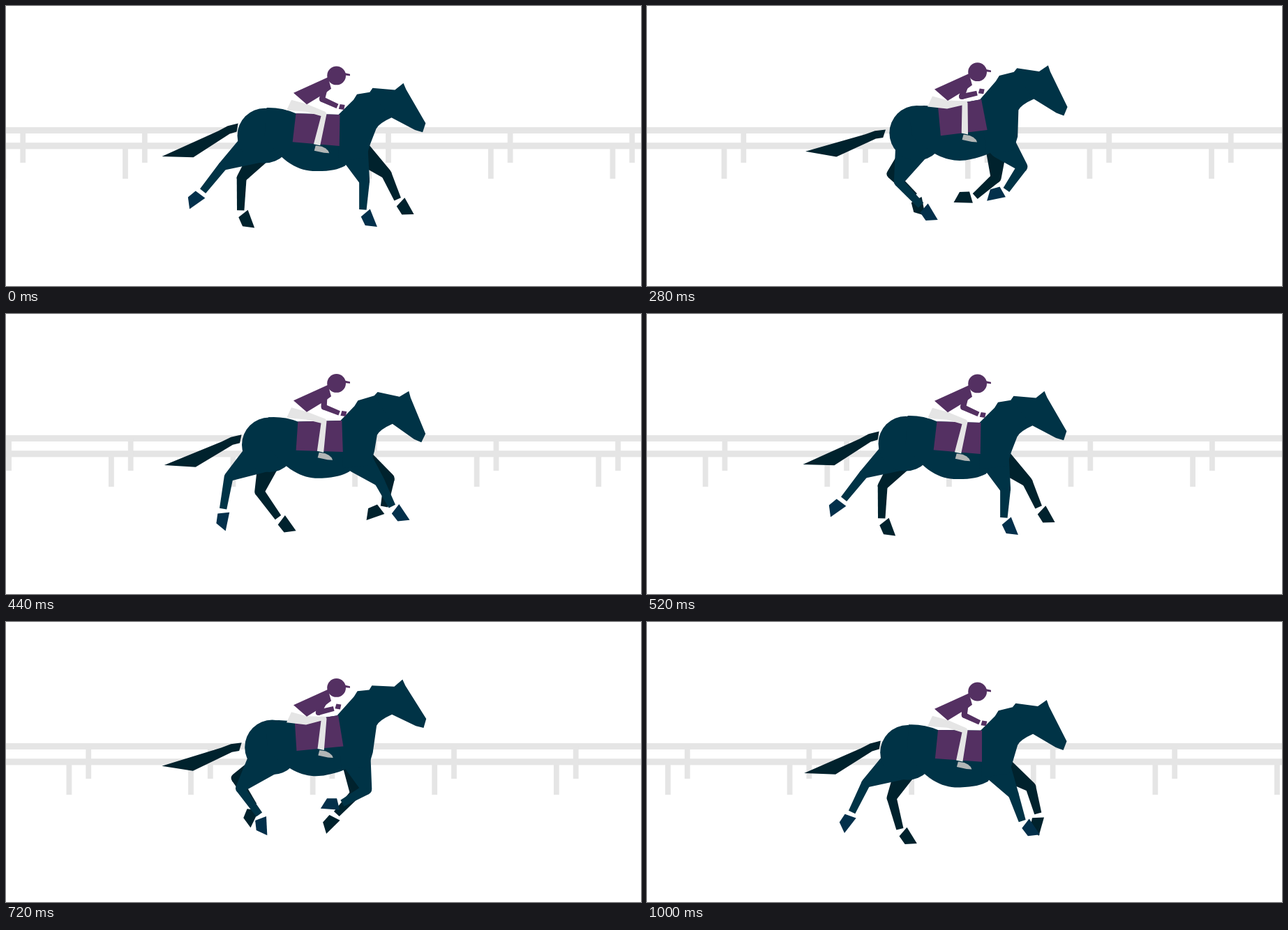
Write an HTML page with a canvas that moves like this. It is 910 px wide and 402 px high and loops after 1.04 s.

```html
<!DOCTYPE html>
<html lang="en">
<head>
<meta charset="utf-8">
<title>Galloping horse</title>
<style>
html, body { margin: 0; width: 100%; height: 100%; overflow: hidden; background: #fff; }
canvas { display: block; }
</style>
</head>
<body>
<canvas id="stage" width="910" height="402"></canvas>
<script>
const ctx = document.getElementById('stage').getContext('2d');
const LOOP = 1040, STRIDE = 520, STEP = 40, GAP = 174.6;
const GREY = '#e5e5e5', COAT = '#003346', DARK = '#00222d', HOOF = '#03304b',
      PURPLE = '#543062', SHOE = '#b2b6b6';
const RAD = Math.PI / 180;

let phase = 0; // angle within the stride

// Mean plus the first two harmonics of the stride
const wave = (mean, c1 = 0, s1 = 0, c2 = 0, s2 = 0) => mean +
  c1 * Math.cos(phase) + s1 * Math.sin(phase) +
  c2 * Math.cos(2 * phase) + s2 * Math.sin(2 * phase);

const turn = (x, y, deg) => {
  const c = Math.cos(deg * RAD), s = Math.sin(deg * RAD);
  return [x * c - y * s, x * s + y * c];
};

function poly(color, ...pts) {
  ctx.fillStyle = color;
  ctx.beginPath();
  for (let i = 0; i < pts.length; i += 2) ctx.lineTo(pts[i], pts[i + 1]);
  ctx.fill();
}

function disc(color, x, y, r) {
  ctx.fillStyle = color;
  ctx.beginPath();
  ctx.arc(x, y, r, 0, 7);
  ctx.fill();
}

// Hull of two circles
function limb(color, ax, ay, ar, bx, by, br) {
  const dir = Math.atan2(by - ay, bx - ax);
  const open = Math.acos((ar - br) / Math.hypot(bx - ax, by - ay));
  ctx.fillStyle = color;
  ctx.beginPath();
  ctx.arc(ax, ay, ar, dir + open, dir + 2 * Math.PI - open);
  ctx.arc(bx, by, br, dir - open, dir + open);
  ctx.fill();
}

// Tapered bar with flat ends
function bar(color, ax, ay, ar, bx, by, br) {
  const d = Math.hypot(bx - ax, by - ay), nx = (ay - by) / d, ny = (bx - ax) / d;
  poly(color, ax + nx * ar, ay + ny * ar, bx + nx * br, by + ny * br,
    bx - nx * br, by - ny * br, ax - nx * ar, ay - ny * ar);
}

function placed(x, y, deg, draw) {
  ctx.save();
  ctx.translate(x, y);
  ctx.rotate(deg * RAD);
  draw();
  ctx.restore();
}

// Swing angles as wave terms in degrees: thigh and shin forward from straight down, hoof clockwise
const LEGS = {
  nearHind: { upper: 66, lower: 52.5, root: [3, 0, 29], knee: 6.5, color: COAT, hoofColor: HOOF,
    thigh: [-46, -18, -7.5, 6.3, 2.9], shin: [3.8, -42, -8.8, 0, -5], hoof: [-8.5, 40, 24, 5, -1] },
  farHind: { upper: 60, lower: 51.5, root: [7, 6, 18], knee: 7, color: DARK, hoofColor: DARK,
    thigh: [-32, 5, -24, -2, 1], shin: [27, -18.5, -21, -6, -2], hoof: [-23, -9, 35, -6.5, -1.5] },
  nearFore: { upper: 43, lower: 46, root: [0, 0, 20], knee: 7.5, color: COAT, hoofColor: HOOF,
    thigh: [29, -9, -25], shin: [-22, 24, -41, 0, -5], hoof: [10.5, -55.5, 35.5, 5] },
  farFore: { upper: 47, lower: 45.5, root: [0, 0, 16], knee: 7.5, color: DARK, hoofColor: DARK,
    thigh: [27, 26, -10, -3, -4], shin: [-25, 37, 11, 15, -3], hoof: [24, -54, -59.5, -17, -4.5] }
};

function drawLeg(leg, x, y) {
  const thigh = wave(...leg.thigh) * RAD, shin = wave(...leg.shin) * RAD, tilt = wave(...leg.hoof);
  const kx = x + leg.upper * Math.sin(thigh), ky = y + leg.upper * Math.cos(thigh);
  const hx = kx + leg.lower * Math.sin(shin), hy = ky + leg.lower * Math.cos(shin);
  const [ax, ay] = turn(0, -6, tilt), [dx, dy, r] = leg.root;
  limb(leg.color, x + dx, y + dy, r, kx, ky, leg.knee);
  bar(leg.color, kx, ky, leg.knee, hx + ax, hy + ay, 5.2);
  placed(hx, hy, tilt, () => poly(leg.hoofColor, -8.5, 0, 8.5, 0, 0, 26, -12, 13.6));
}

function drawFence(t) {
  const shift = 5 * GAP * t / LOOP;
  ctx.fillStyle = GREY;
  ctx.fillRect(0, 174, 910, 9);
  ctx.fillRect(0, 196.2, 910, 9.2);
  for (let i = 0; i < 12; i++) {
    const x = i * GAP - shift;
    ctx.fillRect(x - 7.5, 200, 7.8, 48);
    ctx.fillRect(x + 20.3, 178, 7.8, 47);
  }
}

function drawHorse(cx, cy, tilt) {
  const rumpX = wave(378.4, -7.6, -3.9), rumpY = wave(183.8, 2.3, -3.3);
  const chestX = wave(503, -4.1, -5.1), chestY = wave(204.8, 5.8, -1.4);
  const headX = wave(553.3, -.8, -1.2), headY = wave(146.2, 14.1, -4.2);
  const nod = wave(4.3, -.8, -6.5, -2.3, 1.3);
  const hip = [rumpX - 4, rumpY + 8];

  drawLeg(LEGS.farFore, chestX + wave(1, 9), chestY);
  drawLeg(LEGS.farHind, ...hip);
  placed(rumpX - 38 + .55 * tilt, rumpY - 18 - 1.08 * tilt, -.7 * tilt, () =>
    poly(DARK, 0, 0, -15, 4, -28, 11, -109, 48, -64, 49, -12, 15, -2, 12));
  drawLeg(LEGS.nearHind, ...hip);
  drawLeg(LEGS.nearFore, chestX, chestY);
  disc(COAT, rumpX, rumpY, 39.3);

  // Back and belly
  placed(cx, cy, tilt, () => {
    ctx.beginPath();
    ctx.moveTo(-75, 10);
    ctx.bezierCurveTo(-50, 49, -25, 61, 0, 60.5);
    ctx.bezierCurveTo(20, 60.5, 30, 58, 40, 53);
    ctx.lineTo(62, 20);
    ctx.lineTo(33, -20.5);
    ctx.lineTo(-30, -22.5);
    ctx.quadraticCurveTo(-50, -31.5, -72, -31);
    ctx.fill();
  });

  // Neck and chest
  const [withersX, withersY] = turn(31, -20.5, tilt);
  const [maneX, maneY] = turn(-32, -36, nod), [cheekX, cheekY] = turn(6, -20, nod);
  ctx.beginPath();
  ctx.moveTo(cx + withersX, cy + withersY);
  ctx.lineTo(headX - 54.5, headY - 25.5);
  ctx.lineTo(headX - 49.5, headY - 33.5);
  ctx.lineTo(headX + maneX, headY + maneY);
  ctx.lineTo(headX + cheekX, headY + cheekY);
  ctx.lineTo(headX, headY);
  ctx.quadraticCurveTo(headX - 18, headY + 8, headX - 22, headY + 16);
  ctx.lineTo(chestX + 23, chestY - 12);
  ctx.lineTo(chestX + 17, chestY + 8);
  ctx.lineTo(chestX - 22, chestY + 12);
  ctx.fill();
  placed(headX, headY, nod, () =>
    poly(COAT, 0, 0, -32, -36, -28, -42, 4, -40, 16, -50, 20, -41, 49, 7, 45, 20, 34, 17));

  placed(cx, cy, tilt, () => poly(PURPLE, -30, -22.5, 33, -20.5, 32, 24.5, -35, 18.5));
}

// The rider follows the trunk
function drawRider(cx, cy, tilt) {
  const sink = cy - 177.5, bob = sink / 3, kneeY = cy - 22.5;
  const ax = cx - .36 * tilt, ay = cy + 22.6;
  const ex = wave(451.5, 1.5, -4), ey = 134 + .7 * bob;
  const wx = ex + 22, wy = 145 + 1.2 * sink;

  poly(SHOE, ax - 2, ay + 1, ax + 7, ay + 2.5, ax + 12, ay + 5, ax + 16, ay + 8.5,
    ax + 17.5, ay + 12, ax + 10, ay + 11.5, ax - 4, ay + 8.5);
  poly(GREY, 409, 135 + bob, 402, 150 + bob, 430, 152 + .8 * bob, 451.5, kneeY + 4,
    ax - 4.8, ay - 1, ax + 4.5, ay + 1, 459.5, kneeY + 1, 458, kneeY - 2, 431, 141 + bob);

  bar(PURPLE, 456, 120 + bob, 4.5, ex, ey, 4);
  disc(PURPLE, ex, ey, 4);
  bar(PURPLE, ex, ey, 4, wx, wy, 3.4);
  placed(wx + 6.2, wy + (wy - ey) / 4 - 1.5, 8, () =>
    poly(PURPLE, -3, -3.5, 4, -3.5, 3.5, 3.5, -4, 3.5));

  placed(0, bob, 0, () => {
    poly(PURPLE, 412, 125, 461.5, 102.5, 466, 119, 458, 125, 431, 141.5);
    disc(PURPLE, 473.6, 100.2, 13.4);
    poly(PURPLE, 484, 96, 493, 98, 493, 100.6, 484, 99.5);
  });
}

function frame(now) {
  const t = Math.floor(now % LOOP / STEP) * STEP;
  phase = 2 * Math.PI * t / STRIDE;
  const trunk = [wave(448, -2.4, -3.5), wave(168.3, 8.3, -2.7), wave(-6.3, 6, .3)];
  ctx.clearRect(0, 0, 910, 402);
  drawFence(t);
  drawHorse(...trunk);
  drawRider(...trunk);
  requestAnimationFrame(frame);
}
frame(performance.now());
</script>
</body>
</html>
```
